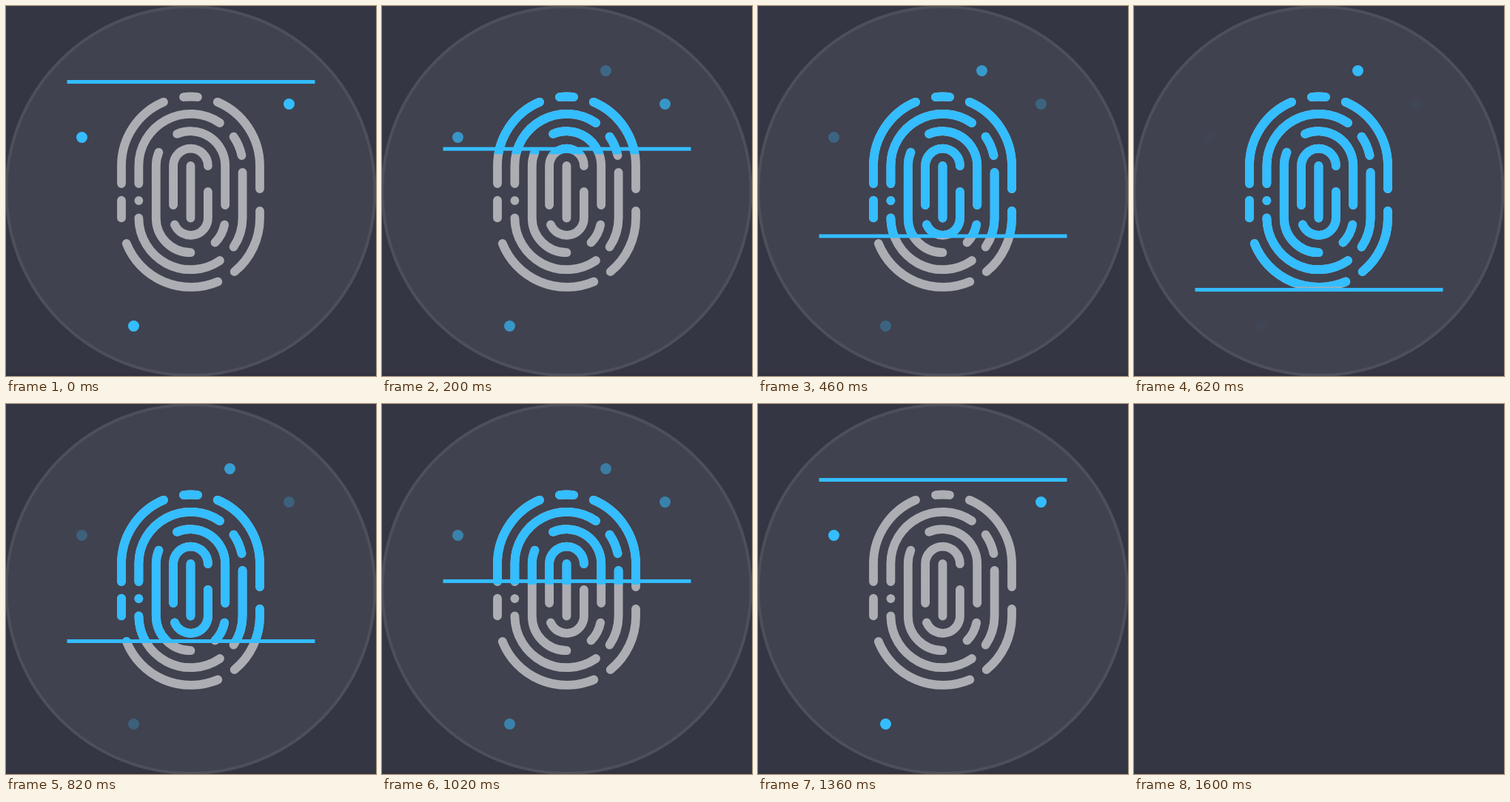
Recreate the animation shown at these times as an HTML page. Size 500 px wide and 500 px high, loop 1.62 s.

```html
<!DOCTYPE html>
<html lang="en">
<head>
<meta charset="utf-8">
<title>Fingerprint scan</title>
<style>
  html, body { margin: 0; width: 100%; height: 100%; overflow: hidden; background: #343644; }
  #stage { position: relative; width: 500px; height: 500px; overflow: hidden; }
  #stage::before { content: ""; position: absolute; inset: 496px 0 0; background: #32333f; }
  #scene, #scene svg { position: absolute; inset: 0; width: 500px; height: 500px; }
  .print { fill: none; stroke-width: 11.8; stroke-linecap: round; }
  .blue { fill: #34bdff; }
  #scanned { stroke: #34bdff; }
  #plain { stroke: #adaeb4; }
</style>
</head>
<body>
<div id="stage">
  <div id="scene">
    <svg viewBox="0 0 500 500">
      <circle cx="249.5" cy="250" r="249" fill="#40424f" stroke="#4d4f5b" stroke-width="4"/>
      <g id="dots" class="blue">
        <circle cx="102.5" cy="177.5" r="7.5"/>
        <circle cx="382.5" cy="132.5" r="7.5"/>
        <circle cx="172.5" cy="432.5" r="7.5"/>
      </g>
      <circle id="loneDot" class="blue" cx="302.5" cy="87.5" r="7.5"/>
      <path id="plain" class="print"/>
    </svg>
    <svg id="reveal" viewBox="0 0 500 500"><path id="scanned" class="print"/></svg>
    <svg viewBox="0 0 500 500">
      <rect id="beam" class="blue" x="82.5" y="0" width="335" height="5"/>
    </svg>
  </div>
</div>
<script>
  const LOOP = 1620, BOTTOM = 640, TOP = 1360, BLANK = 1600, FRAME = 20;
  const $ = id => document.getElementById(id);

  // Ridges are concentric stadium shapes; arcs run clockwise unless sweep is 0.
  const arc = (ring, x, y, sweep = 1, large = 0) => {
    const r = ring * 23.37;
    return `A${r} ${r} 0 ${large} ${sweep} ${x} ${y}`;
  };
  const ridges = [
    // outer ring
    'M240 123' + arc(4, 259, 123),
    'M156 240V216' + arc(4, 213, 129.8),
    'M285.8 129.8' + arc(4, 343, 216) + 'V247',
    'M156 262.7V286.3',
    'M162.8 321' + arc(4, 286.3, 372.5, 0),
    'M343 277V286.5' + arc(4, 308.7, 359),
    // second ring
    'M179.4 240V216' + arc(3, 289, 158),
    'M307.6 176.6' + arc(3, 318.5, 202),
    'M319.6 225V286.5' + arc(3, 307.6, 325.5),
    'M179.4 263h.01',
    'M179.4 286.5' + arc(3, 289, 344, 0),
    // third ring
    'M206.4 197.7' + arc(2, 202.8, 216, 0) + 'V286.5' + arc(2, 249.5, 333.2, 0),
    'M231.2 172.9' + arc(2, 296.2, 216) + 'V269',
    'M295.2 295.6' + arc(2, 282.5, 319.6),
    // core
    'M226.1 269V216' + arc(1, 272.9, 216),
    'M272.9 251V286.5' + arc(1, 228, 295.5),
    'M249.5 216V286.5'
  ].join('');
  $('plain').setAttribute('d', ridges);
  $('scanned').setAttribute('d', ridges);

  // Sweeps from one value to another and back in whole frames, then rests.
  const sweep = (id, prop, from, to) => $(id).animate([
    { offset: 0, [prop]: from, easing: `steps(${BOTTOM / FRAME})` },
    { offset: BOTTOM / LOOP, [prop]: to, easing: `steps(${(TOP - BOTTOM) / FRAME})` },
    { offset: TOP / LOOP, [prop]: from },
    { offset: 1, [prop]: from }
  ], { duration: LOOP, iterations: Infinity });

  const revealTo = y => `inset(0 0 ${500 - y}px 0)`;

  sweep('beam', 'transform', 'translateY(100px)', 'translateY(390px)');
  sweep('reveal', 'clipPath', revealTo(115), revealTo(388));
  sweep('dots', 'opacity', 1, 0);
  sweep('loneDot', 'opacity', 0, 1);

  $('scene').animate([
    { offset: 0, opacity: 1 },
    { offset: BLANK / LOOP, opacity: 1 },
    { offset: BLANK / LOOP, opacity: 0 },
    { offset: 1, opacity: 0 }
  ], { duration: LOOP, iterations: Infinity });
</script>
</body>
</html>
```
